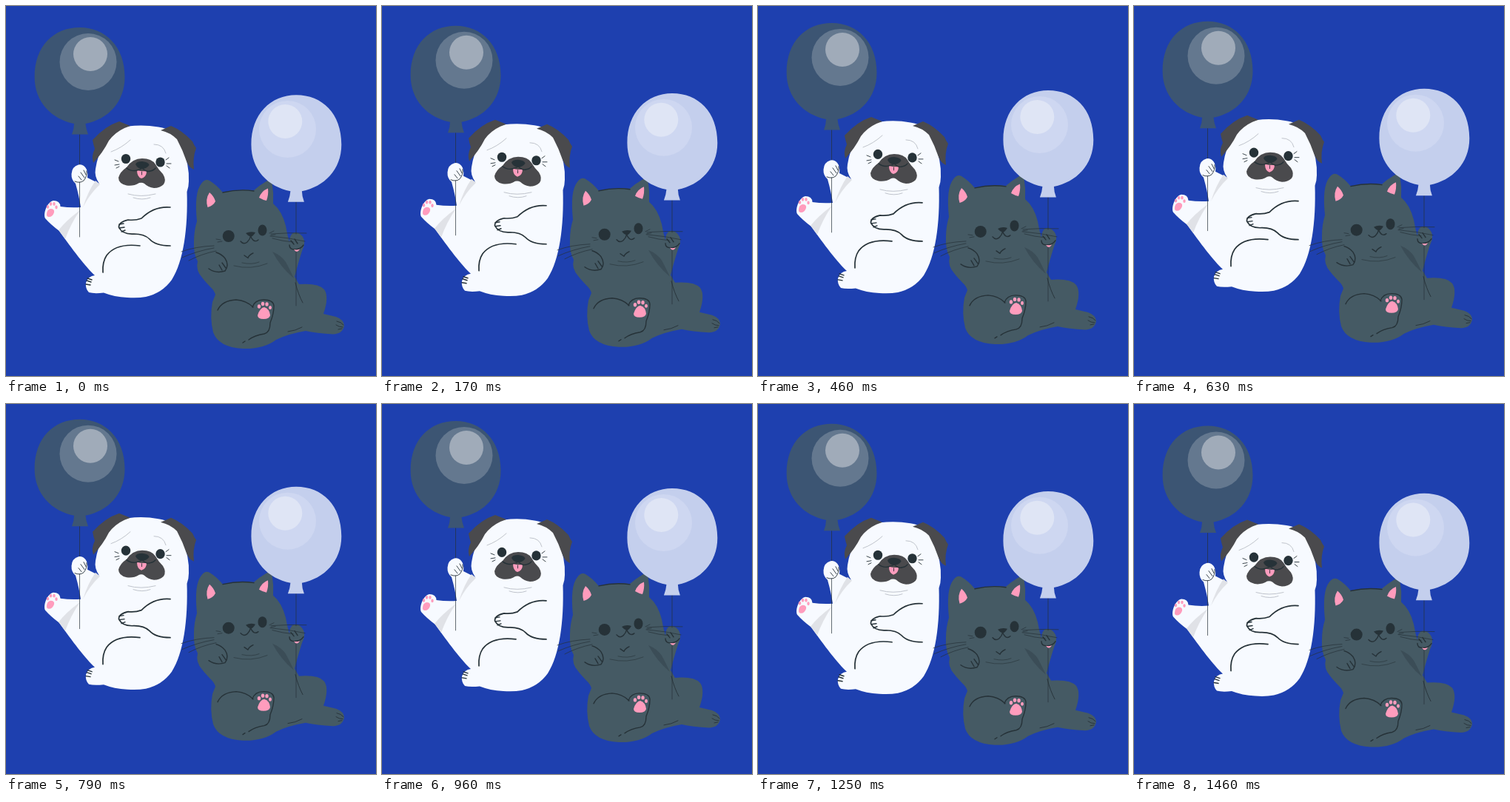
Animation of 500 by 500 pixels, one loop 1.5 s. Source, as an HTML page:

```html
<!DOCTYPE html>
<html lang="en">
<head>
<meta charset="utf-8">
<title>Floating pets</title>
<style>
  html, body { margin: 0; height: 100%; overflow: hidden; background: #1e40af; }
  svg { display: block; width: 100vw; height: 100vh; }
  .line { fill: none; stroke: #263238; stroke-width: 1.4; stroke-linecap: round; stroke-linejoin: round; }
  .bold { stroke-width: 1.7; }
  .thin { stroke-width: .9; }
  .hair { stroke-width: .7; }
  .soft { stroke: #b9bec6; }
  .ink { fill: #263238; }
  .pink { fill: #ff9cbd; }
  .fur { fill: #455a64; }
  .shade { fill: #3b4d57; }
  .white { fill: #f7faff; }
  .fold { fill: #e0e2e7; }
  .mask { fill: #4a4a4d; }
</style>
</head>
<body>
<svg viewBox="0 0 500 500">
  <defs>
    <path id="balloon" d="M99.7 29C134.500 29 160.500 55 160.500 96C160.500 130 138 153 107.500 159Q108 166 111 173.500H89Q92 166 92 159C62 153 38.600 130 38.600 96C38.600 54 64.500 29 99.700 29Z"/>
  </defs>
  <g id="scene">
    <g id="dog-balloon">
      <use href="#balloon" fill="#3c5573"/>
      <circle cx="111" cy="75.500" r="38.500" fill="#64788f"/>
      <circle cx="114" cy="65" r="23" fill="#a0abb9"/>
    </g>

    <g id="dog">
      <path class="line hair" d="M99.500 174V220"/>
      <path class="white" d="M165 162.500Q186 160 206 163.500Q228 166 238 190Q248 215 247 237Q247 244 244.500 251C246 300 240 345 224 370Q211 388 189 393Q178 395 164 394Q146 393 132 387.500Q119 389 112 387Q107 382 108 374Q111 365 120 364C108 353 89 328 72 304Q60 295 53 287C50 281 55 265 64 263Q73 263 73.500 271Q87 273 101 272Q99 258 94 240Q88 235 88.500 227Q89 217 98 214.500Q105 213 109 221Q111 227 110 232L126 240Q119 230 121 220Q124 201 132 187Q147 165 165 162.500Z"/>
      <path class="fold" d="M121 236L127 241Q113 254 104 272Q111 250 121 236ZM100 276Q81 290 71 303L80 315Q87 295 100 276Z"/>
      <path class="mask" d="M153 156L168 162L160 165Q147 171 139 182Q131 198 118 212Q115 203 120 193Q118 187 117 181Q134 162 153 156ZM209 168L223 162Q238 168 252 183Q254 188 257 192Q252 205 254 221Q247 218 244 210Q239 195 231 180Q222 171 209 168Z"/>
      <path class="line thin soft" d="M142 197Q156 192 168 181M200 187Q213 187 216 199"/>
      <ellipse class="ink" cx="162" cy="206.500" rx="6.200" ry="6.600"/>
      <ellipse class="ink" cx="208.500" cy="211" rx="6.200" ry="6.600"/>
      <path class="mask" d="M184 206Q197 206 202 214Q206 221 212 227Q217 235 213 241Q208 246 200 246Q192 245 187 240Q184 238 180 239Q172 244 163 242.500Q152 240 152 232Q154 224 163 218Q171 206 184 206Z"/>
      <path class="ink" d="M175 214Q176 210 184 210Q193 211 193.500 215Q190 220 184 220Q178 220 175 214Z"/>
      <path class="pink" d="M177 222Q184 224 190 223Q190 231 183 233Q177 231 177 222Z"/>
      <path class="line" d="M163 219Q169 224 177 222Q182 221 184 219Q190 225 195 223Q200 222 202 219"/>
      <path class="line thin" d="M183.500 224V228M147 208L152 210M147 215L153 214M149 219L153 217M216 208L220 205M217 213L223 213M217 216L221 219"/>
      <path class="line thin soft" d="M165 254Q182 259 202 254M172 259Q184 263 195 259"/>
      <path class="line bold" d="M222 272Q200 270 183 287Q175 290 165 289Q152 292 152.500 299Q157 309 173 308Q187 308 194 315Q202 324 222 324M181 324Q149 320 136 337Q130 346 131 360"/>
      <path class="line" d="M153 295L159 294M153 300L160 299M156 305L161 303M109 371L115 373M108 376L114 377M110 368L116 370"/>
      <path class="line thin" d="M93 237Q100 240 105 236Q110 230 109 223M98 230L102 235M101 225L106 232M105 222L108 228"/>
      <path class="line hair" d="M99.500 238V312"/>
      <path class="pink" d="M55 282Q55 275 60 274Q66 274 65 279Q63 285 58 285Q55 285 55 282Z"/>
      <g class="pink">
        <ellipse cx="56.500" cy="271.500" rx="1.700" ry="2.400"/>
        <ellipse cx="60.500" cy="267.500" rx="1.700" ry="2.400"/>
        <ellipse cx="65" cy="267.500" rx="1.700" ry="2.400"/>
        <ellipse cx="68" cy="272" rx="1.700" ry="2.400"/>
      </g>
    </g>

    <g id="cat">
      <path class="fur" d="M258 291Q254 252 264 240Q269 233 275 236Q285 242 293 252Q314 247 335 249Q343 242 350 238Q357 233 359.500 239Q362 253 361 267Q373 277 378 297Q380 309 383 319Q383 308 390 306Q398 306 402 314Q405 321 400 331Q394 350 390 366L396 376Q422 374 430 383Q437 393 429 416L446 420Q457 424 457 432Q455 443 442 443.500Q419 442 405 439Q381 443 365 451Q348 464 320 463Q287 461 280 441Q275 421 279 400L283 390C281 382 273 378 265 367Q256 357 259 345Q253 335 254 318Q254 304 258 291Z"/>
      <path class="shade" d="M360 332Q372 337 378 346Q383 355 389 368Q371 353 360 332Z"/>
      <path class="line" d="M293 252Q315 247 335 250"/>
      <path class="pink" d="M275 252Q281 257 283 264Q280 270 272.500 272Q269 261 275 252ZM342 259Q345 250 354 246.500Q355 255 352 263Q347 262 342 259Z"/>
      <ellipse class="ink" cx="300.700" cy="311" rx="8" ry="8"/>
      <ellipse class="ink" cx="346.500" cy="303" rx="6" ry="7.500"/>
      <path class="ink" d="M324 307Q330 304 337 306Q334 311 331 312Q327 311 324 307Z"/>
      <path class="line" d="M317 318Q321 323 326 319Q330 315 330.500 311Q335 321 341 316M322 337L327 340.500Q328 337 334 334"/>
      <path class="line hair" d="M281 324Q256 325 237 332M281 327Q258 331 238 340M284 331Q264 335 247 344M358 308Q382 306 406 307M357 311Q382 313 404 318M360 314Q374 318 388 319M284 315L290 316M286 319L292 318M356 307L362 304M358 310L364 309"/>
      <path class="line thin" d="M308 351Q331 357 353 348M319 347Q332 350 342 346" opacity=".65"/>
      <path class="line" d="M274 355Q284 362 296 358Q302 350 296 341Q291 335 284 333M288 350L292 357M292 347L297 354"/>
      <path class="line" d="M286 411Q292 398 311 397Q325 398 334 407"/>
      <path class="line" d="M333 407Q336 397 348 397Q361 397 362 405Q362 416 357 428Q357 441 349 443Q336 445 328 451M320 455L323 453"/>
      <path class="pink" d="M340 418Q343 408 349 407Q356 409 357 418Q356 423 348 423Q340 423 340 418Z"/>
      <g class="pink">
        <ellipse cx="342" cy="406" rx="2.200" ry="2.700"/>
        <ellipse cx="347" cy="402.500" rx="2.200" ry="2.700"/>
        <ellipse cx="352.500" cy="403" rx="2.200" ry="2.700"/>
        <ellipse cx="357" cy="407.500" rx="2" ry="2.600"/>
      </g>
      <path class="line thin" d="M391 374Q395 390 401 401M381 440Q391 439 400 434M447 426Q453 427 456 431M446 431Q450 434 455 434M449 437L454 436"/>
      <path class="line" d="M383 323Q383 329 390 329Q398 329 402 323M385 317L389 322M390 315L394 321"/>
      <path class="pink" d="M389 329Q393 330 397 328.500Q395 332 392 332Z"/>
      <path class="line hair" d="M392 264V308M392 332V405"/>
    </g>

    <g id="cat-balloon">
      <use href="#balloon" transform="translate(491.9 91.200) scale(-1 1)" fill="#c4cfed"/>
      <circle cx="380.500" cy="166.500" r="38.500" fill="#ced7f1"/>
      <circle cx="377.300" cy="156" r="23" fill="#dfe5f5"/>
    </g>
  </g>
</svg>
<script>
  const FRAMES = 36, FPS = 24, RISE = 10;
  const scene = document.getElementById("scene");
  const start = performance.now();

  // Steady rise and fall, stepped at 24 pictures per second.
  function draw(now) {
    const step = Math.floor(Math.max(0, now - start) * FPS / 1000 + 0.05);
    const phase = ((step + 1) % FRAMES) / FRAMES;
    const lift = RISE * (1 - Math.abs(1 - 2 * phase));
    scene.setAttribute("transform", `translate(0 ${0.55 - lift})`);
    requestAnimationFrame(draw);
  }
  draw(start);
</script>
</body>
</html>
```
